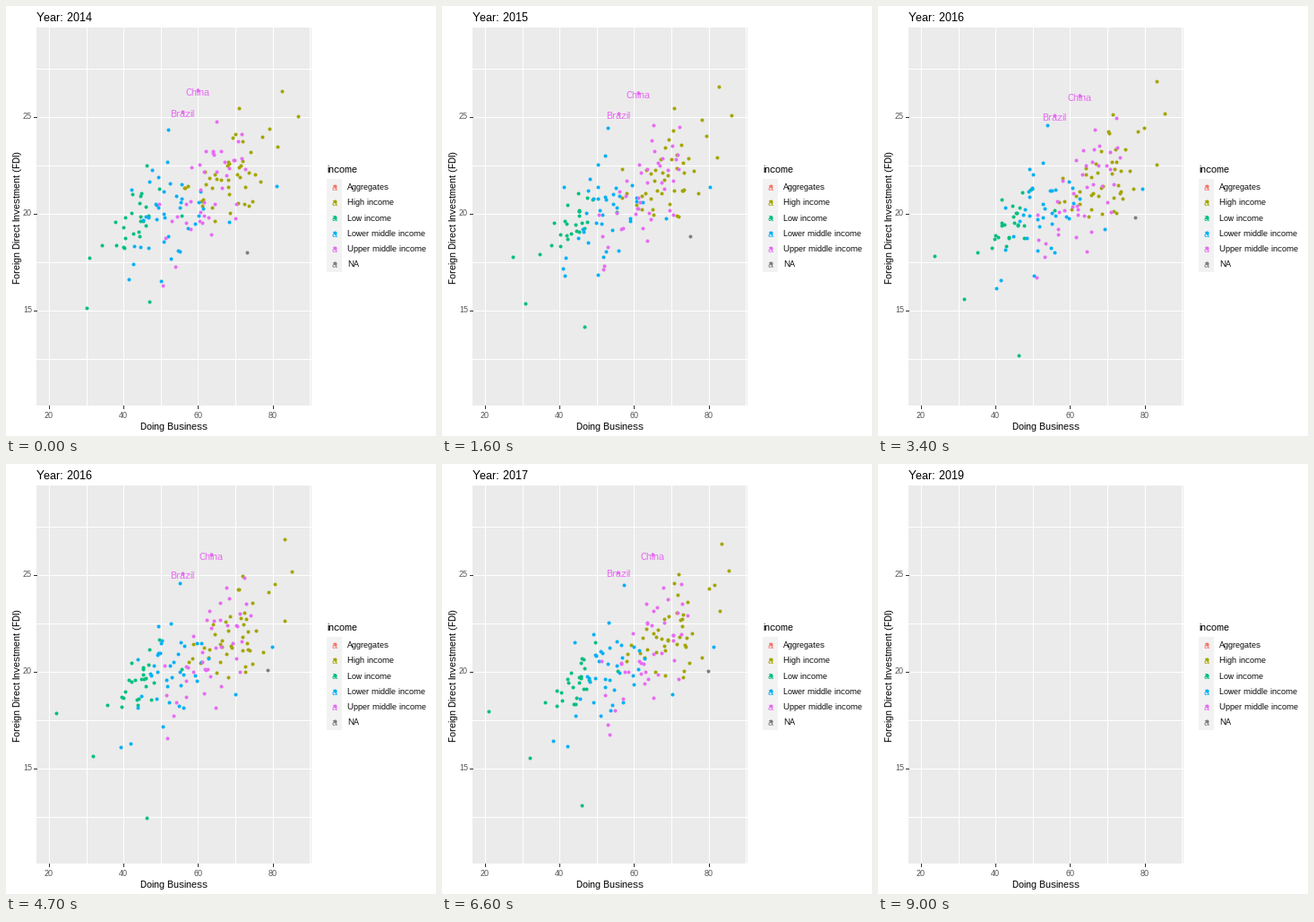
A matplotlib script for the animation above (10 s loop, 480x480 px).

```python
import numpy as np
import matplotlib.pyplot as plt
from matplotlib.animation import FuncAnimation
from matplotlib.patches import Rectangle

SIZE, DPI = 480, 72          # at 72 dpi one point is one pixel
FRAMES, INTERVAL = 100, 100
FIRST_YEAR, SPAN, DATA_YEARS = 2014, 5, 4
LEFT, TOP, RIGHT, BOTTOM = 34, 24, 341, 446

# Full hinting on whole pixels keeps the small text crisp
plt.rcParams.update({"font.family": "Liberation Sans",
                     "text.hinting": "native", "text.hinting_factor": 1})

COLORS = {
    "Aggregates": "#F8766D",
    "High income": "#A3A500",
    "Low income": "#00BF7D",
    "Lower middle income": "#00B0F6",
    "Upper middle income": "#E76BF3",
    "NA": "#7F7F7F",
}

# Cloud of each group in stage pixels:
# count, centre, width, slope, spread about the slope, drift per year
CLOUDS = {
    "High income": (43, (262, 180), 31, -0.9, 30, (1.5, 0.5)),
    "Low income": (25, (153, 240), 22, -0.5, 24, (1.5, 1.5)),
    "Lower middle income": (38, (191, 220), 29, -0.4, 33, (2.0, 0.5)),
    "Upper middle income": (41, (219, 214), 27, -0.9, 28, (2.0, 1.0)),
}
YEARLY_SCATTER = (3, 9)

# Countries off the clouds: places at the first, middle and last data year
CHINA = [(214, 94), (227, 101.5), (239, 101)]
BRAZIL = [(197, 118), (197, 123), (196, 120)]
OUTLIERS = {
    "High income": [
        [(308, 95), (311, 82), (313, 92)],
        [(326, 123), (319, 120), (321, 118)],
    ],
    "Low income": [
        [(93, 281), (58, 279), (49, 275)],
        [(90, 337), (97, 325), (99, 330)],
        [(160, 330), (157, 400), (156, 372)],
    ],
    "Lower middle income": [
        [(181, 138), (190, 132), (210, 136)],
        [(302, 201), (294, 204), (308, 204)],
        [(142, 288), (130, 319), (121, 304)],
    ],
    "Upper middle income": [CHINA, BRAZIL],
    "NA": [[(269, 275), (290, 230), (301, 231)]],
}


def x_pos(value):
    return 47.9 + (value - 20) * 4.163


def y_pos(value):
    return 124 + (25 - value) * 21.6


def make_cloud(rng, count, centre, width, slope, spread, drift):
    """Places per year, shaped (year, country, 2)."""
    u, v = np.clip(rng.normal(size=(2, count)), -2, 2)
    start = np.column_stack([width * u, slope * width * u + spread * v])
    years = np.arange(DATA_YEARS + 1)[:, None, None]
    noise = rng.normal(0, YEARLY_SCATTER, (DATA_YEARS + 1, count, 2))
    return centre + start + years * np.array(drift) + noise


def on_path(path, year):
    key_years = np.linspace(0, DATA_YEARS, len(path))
    return [np.interp(year, key_years, axis) for axis in zip(*path)]


rng = np.random.default_rng(7)
PLACES = {group: make_cloud(rng, *shape) for group, shape in CLOUDS.items()}

fig = plt.figure(figsize=(SIZE / DPI, SIZE / DPI), dpi=DPI, facecolor="white")
ax = fig.add_axes([0, 0, 1, 1])
ax.set_xlim(0, SIZE)
ax.set_ylim(SIZE, 0)
ax.axis("off")


def box(x, y, w, h, color):
    return ax.add_patch(Rectangle((x, y), w, h, fc=color, lw=0, zorder=0))


def line(xs, ys, color):
    ax.plot(xs, ys, color=color, lw=1, solid_capstyle="butt",
            antialiased=False, zorder=1)


def label(x, y, text, size, color="black", **kw):
    return ax.text(x, y, text, size=size, color=color, **kw)


def draw_panel():
    panel = box(LEFT, TOP, RIGHT - LEFT, BOTTOM - TOP, "#EBEBEB")
    for v in range(20, 91, 10):
        x = x_pos(v)
        line([x, x], [TOP, BOTTOM], "white")
        if v % 20 == 0:
            line([x, x], [BOTTOM, BOTTOM + 3], "#333333")
            label(x, 460, str(v), 9, "#4D4D4D", ha="center")
    for v in np.arange(12.5, 28, 2.5):
        y = y_pos(v)
        line([LEFT, RIGHT], [y, y], "white")
        if v % 5 == 0:
            line([LEFT - 3, LEFT], [y, y], "#333333")
            label(29, y + 2, f"{v:.0f}", 9, "#4D4D4D", ha="right")
    label(187, 473, "Doing Business", 11, ha="center")
    label(16, 235.5, "Foreign Direct Investment (FDI)", 11, rotation=90,
          ha="center", va="baseline", rotation_mode="anchor")
    return panel


def draw_legend():
    label(358, 186, "income", 11)
    for k, (group, color) in enumerate(COLORS.items()):
        y = 193.2 + 17.28 * k
        box(358, y, 17.28, 17.28, "#F2F2F2")
        ax.scatter([366.5], [y + 7.8], s=16, c=color, lw=0, zorder=3)
        label(366.5, y + 12.6, "a", 11, color, ha="center")
        label(381, y + 11.8, group, 9)


panel = draw_panel()
draw_legend()
title = label(LEFT, 17, "", 13)
dots = {}
for group in OUTLIERS:
    dots[group] = ax.scatter([], [], s=16, c=COLORS[group], lw=0,
                             antialiased=False, zorder=3)
    dots[group].set_clip_path(panel)
tags = [(path, label(0, 0, name, 11, COLORS["Upper middle income"],
                     ha="center", zorder=4))
        for path, name in ((CHINA, "China"), (BRAZIL, "Brazil"))]


def places_at(group, year):
    points = [on_path(path, year) for path in OUTLIERS[group]]
    if group in PLACES:
        k = min(int(year), DATA_YEARS - 1)
        a, b = PLACES[group][k:k + 2]
        points.extend(a + (b - a) * (year - k))
    return np.array(points)


def update(i):
    year = SPAN * i / (FRAMES - 1)
    title.set_text(f"Year: {int(FIRST_YEAR + year + 0.5)}")
    shown = year <= DATA_YEARS
    for group, artist in dots.items():
        artist.set_offsets(places_at(group, year))
        artist.set_visible(shown)
    for path, tag in tags:
        x, y = on_path(path, year)
        tag.set_position((x, y + 5.5))
        tag.set_visible(shown)
    return [title, *dots.values(), *(tag for _, tag in tags)]


anim = FuncAnimation(fig, update, frames=FRAMES, interval=INTERVAL,
                     repeat=True, repeat_delay=0, blit=False)
plt.show()
```
